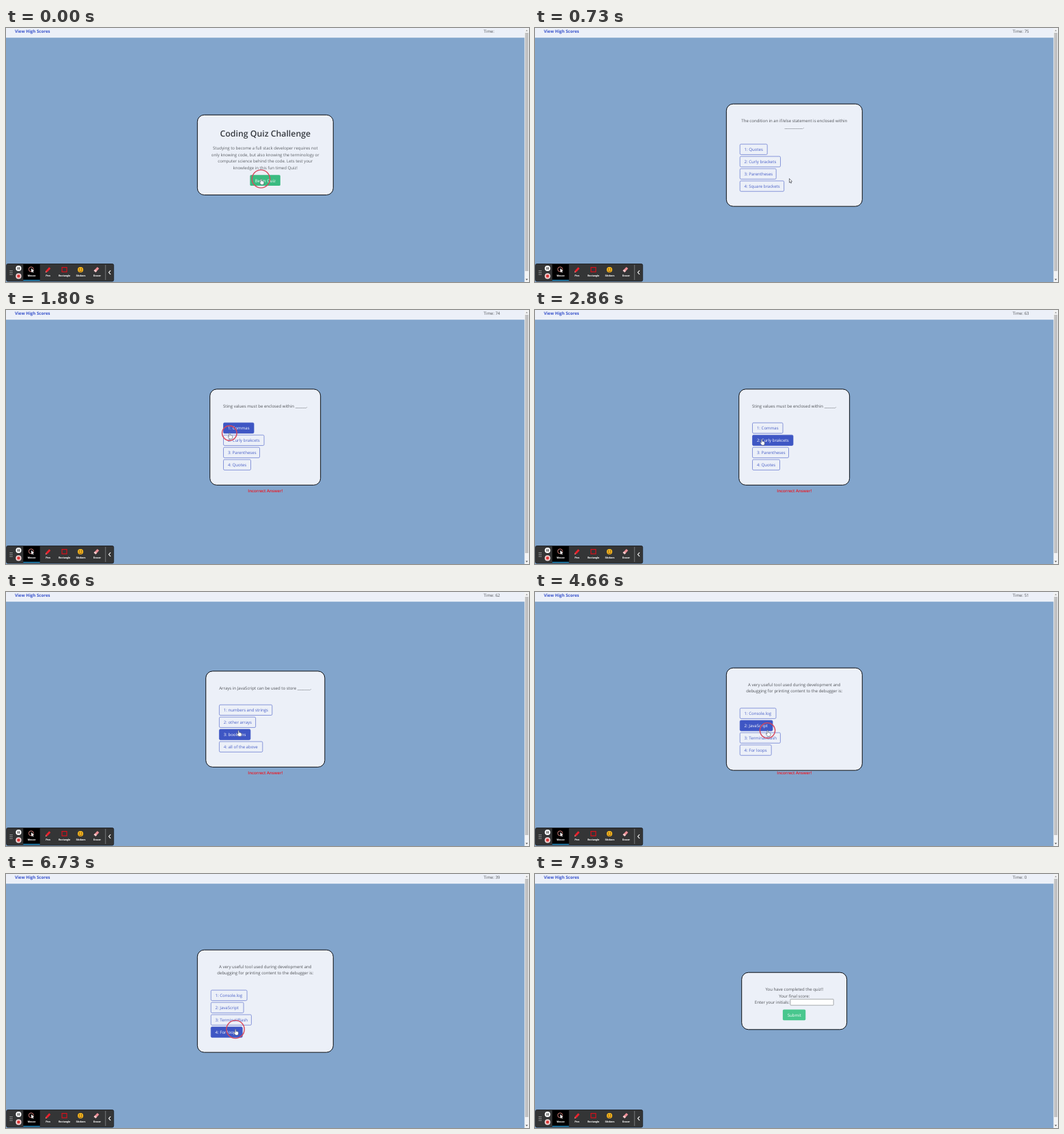
Animation of 766 by 372 pixels, one loop 8 s. Source, as an HTML page with a canvas:

```html
<!DOCTYPE html>
<html lang="en">
<head>
<meta charset="utf-8">
<title>Coding Quiz</title>
<style>
  html, body { margin: 0; width: 100%; height: 100%; overflow: hidden; background: #82a5cc; }
  canvas { display: block; width: 766px; height: 372px; }
</style>
</head>
<body>
<canvas id="stage"></canvas>
<script>
const W = 766, H = 372, LOOP = 8000, MID = 379.8;
const BODY = 6.07;
const PANEL = '#ecf0f8', INK = '#505358', BLUE = '#485fc7', BLUE_ON = '#3e56c4';
const canvas = document.getElementById('stage');
const ctx = canvas.getContext('2d');
const dpr = window.devicePixelRatio || 1;
canvas.width = W * dpr;
canvas.height = H * dpr;

// A press shows a ring; the page reacts SWITCH ms later.
const SWITCH = 130, RING_LIFE = 200;
const presses = [-70, 1660, 3460, 4530, 6660];

const ticks = [[200, 75], [1200, 74], [2200, 63], [3200, 62],
               [4200, 51], [5200, 40], [6200, 39], [6790, 0]];
const notices = [[1790, 3230], [3590, 6100]];

// Pointer moves: start, end, target x, target y
const start = [373.4, 221];
const moves = [
  [60, 400, 372.5, 220.5], [730, 1400, 327.3, 180.3], [2200, 2530, 331, 188],
  [2730, 3400, 340.5, 202.8], [5000, 5150, 340.5, 188.3],
  [5860, 6400, 336, 227.5], [7460, 7660, 350, 219]
];
const POINTER_GONE = 7800;

const questions = [
  { card: [280.3, 111.2, 199, 150], left: 300.2, top: 170.1,
    lines: ['The condition in an if/else statement is enclosed within', '__________.'],
    options: [['Quotes', 40], ['Curly brackets', 59.3], ['Parentheses', 53], ['Square brackets', 64.5]] },
  { card: [298.7, 115.9, 162, 140.5], left: 318.5, top: 165.2,
    lines: ['Sting values must be enclosed within ______.'],
    options: [['Commas', 44.5], ['Curly brakcets', 59.5], ['Parentheses', 53], ['Quotes', 40]] },
  { card: [292.7, 115.9, 174.2, 140.5], left: 312.4, top: 165.2,
    lines: ['Arrays in JavaScript can be used to store _______.'],
    options: [['numbers and strings', 77.4], ['other arrays', 53.2], ['booleans', 45.5], ['all of the above', 63.4]] },
  { card: [280.3, 111.2, 199, 150], left: 300.2, top: 170.1,
    lines: ['A very useful tool used during development and',
            'debugging for printing content to the debugger is:'],
    options: [['Console.log', 52.8], ['JavaScript', 47.8], ['Terminal/Bash', 59.2], ['For loops', 46]] }
];

const clamp = v => Math.max(0, Math.min(1, v));
const ease = v => v * v * (3 - 2 * v);
const mix = (a, b, v) => a + (b - a) * v;
const inside = (p, [x, y, w, h]) => p[0] >= x && p[0] <= x + w && p[1] >= y && p[1] <= y + h;

// Type is set large and scaled down so that glyph spacing stays even.
function text(str, x, y, { size = BODY, weight = 400, color = INK, align = 'left', font = '"Open Sans"' } = {}) {
  ctx.save();
  ctx.translate(x, y);
  ctx.scale(.25, .25);
  ctx.font = `${weight} ${size * 4}px ${font}, sans-serif`;
  ctx.textAlign = align;
  ctx.fillStyle = color;
  ctx.fillText(str, 0, 0);
  ctx.restore();
}

function centered(str, y, opts = {}) {
  text(str, MID, y, { align: 'center', ...opts });
}

function rect(x, y, w, h, color) {
  ctx.fillStyle = color;
  ctx.fillRect(x, y, w, h);
}

function box([x, y, w, h], r, fill, stroke, line = 1) {
  ctx.beginPath();
  ctx.roundRect(x, y, w, h, r);
  if (fill) { ctx.fillStyle = fill; ctx.fill(); }
  if (stroke) { ctx.strokeStyle = stroke; ctx.lineWidth = line; ctx.stroke(); }
}

function disc(x, y, r, fill) {
  ctx.beginPath();
  ctx.arc(x, y, r, 0, Math.PI * 2);
  ctx.fillStyle = fill;
  ctx.fill();
}

function ring(x, y, r, color, line) {
  ctx.beginPath();
  ctx.arc(x, y, r, 0, Math.PI * 2);
  ctx.strokeStyle = color;
  ctx.lineWidth = line;
  ctx.stroke();
}

function poly(points, fill, stroke, line = .6) {
  ctx.beginPath();
  points.forEach(([x, y]) => ctx.lineTo(x, y));
  ctx.closePath();
  if (fill) { ctx.fillStyle = fill; ctx.fill(); }
  if (stroke) { ctx.strokeStyle = stroke; ctx.lineWidth = line; ctx.stroke(); }
}

function card(b) {
  box(b, 10, PANEL, '#0c0e12', 1);
}

function pointerAt(t) {
  let [x, y] = start;
  for (const [from, to, nx, ny] of moves) {
    const v = ease(clamp((t - from) / (to - from)));
    x = mix(x, nx, v);
    y = mix(y, ny, v);
  }
  return [x, y];
}

function header(t) {
  rect(0, 0, 760, 14.2, PANEL);
  text('View High Scores', 13, 7.3, { size: 6.15, weight: 700, color: '#3853cb' });
  const tick = ticks.filter(k => k[0] <= t).pop();
  text(tick ? 'Time: ' + tick[1] : 'Time:', 699.5, 7.3);
}

function scrollbar() {
  rect(759.4, 0, 6.6, H, '#f2f3f4');
  rect(760.3, 7, 4.8, 349, '#c1c1c2');
  poly([[761.2, 4.6], [764.2, 4.6], [762.7, 2.8]], '#8a8a8a');
  poly([[761, 367.4], [764.4, 367.4], [762.7, 369.4]], '#505050');
}

// Each screen returns true when the pointer is over a button.
function intro(p) {
  card([280.3, 127.3, 199, 117.2]);
  centered('Coding Quiz Challenge', 159.2, { size: 12.3, weight: 600, color: '#363a40' });
  ['Studying to become a full stack developer requires not',
   'only knowing code, but also knowing the terminology or',
   'computer science behind the code. Lets test your',
   'knowledge in this fun timed Quiz!'
  ].forEach((s, i) => centered(s, 178.2 + i * 9.58, { color: '#5c6066' }));
  const b = [357.4, 215.3, 44.4, 15.8], on = inside(p, b);
  box(b, 1.6, on ? '#3abb81' : '#48c78e');
  centered('Begin Quiz', 225.5, { color: '#fff' });
  return on;
}

function question(q, p) {
  card(q.card);
  q.lines.forEach((s, i) => centered(s, q.card[1] + (q.lines.length > 1 ? 26.5 : 26.8) + i * 9.6));
  let hit = false;
  q.options.forEach(([label, w], i) => {
    const b = [q.left, q.top + i * 17.95, w, 15.3];
    const on = inside(p, b);
    hit = hit || on;
    box(b, 1.6, on ? BLUE_ON : null, on ? BLUE_ON : '#6678cf', .75);
    text(`${i + 1}: ${label}`, b[0] + 6.4, b[1] + 9.9, { color: on ? '#fff' : BLUE });
  });
  return hit;
}

function finish(p) {
  card([302.7, 144.2, 154, 83.6]);
  centered('You have completed the quiz!!', 171);
  centered('Your final score:', 180.6);
  text('Enter your initials:', 321.8, 190.2);
  box([374, 183.3, 63.2, 8.9], .6, '#fff', '#85888c', .7);
  const b = [362.9, 198.4, 33.4, 15.8], on = inside(p, b);
  box(b, 1.6, on ? '#3abb81' : '#48c78e');
  centered('Submit', 208.6, { color: '#fff' });
  return on;
}

function toolbar() {
  box([.7, 345.5, 157, 25.4], 2, '#343536', '#23272d', 1);
  rect(25.3, 346, 24.4, 23.4, '#000');
  rect(25.3, 368.9, 24.4, 1.2, '#1f9fe0');
  for (let i = 0; i < 6; i++)
    rect(5.7 + (i % 2) * 2.3, 355 + (i >> 1) * 2.7, 1.2, 1.2, '#c4c4c4');

  disc(18.4, 352, 4.1, '#fff');
  rect(16.8, 350.3, 1.1, 3.5, '#333');
  rect(18.9, 350.3, 1.1, 3.5, '#333');
  disc(18.4, 363.4, 4.1, '#f4dcdc');
  box([16.3, 361.3, 4.2, 4.2], .8, '#d93636');

  ['Mouse', 'Pen', 'Rectangle', 'Stickers', 'Eraser'].forEach((s, i) =>
    text(s, 37.5 + i * 24, 364.4, { size: 3.8, weight: 700, color: '#fff', align: 'center', font: 'Roboto' }));

  ring(36.8, 353.4, 3.5, '#e58a84', .9);
  poly([[37, 352], [37.2, 358], [38.5, 356.8], [39.6, 358.5], [40.4, 357.9], [39.4, 356.2], [41, 355.7]], '#fff');

  poly([[57.8, 358.2], [58.6, 355.2], [63.2, 350.2], [65.4, 352.3], [60.8, 357.2]], '#e8232d');
  poly([[57.8, 358.2], [58.3, 356.3], [59.6, 357.6]], '#f6b4a8');
  box([82, 350.6, 7, 6.6], 0, null, '#d3121c', 1.2);

  disc(109.1, 354, 4.1, '#f3b51f');
  disc(107.6, 353, .7, '#5b3a08');
  disc(110.6, 353, .7, '#5b3a08');
  ctx.beginPath();
  ctx.arc(109.1, 354.4, 2.2, .2, Math.PI - .2);
  ctx.strokeStyle = '#7a3d10';
  ctx.lineWidth = .8;
  ctx.stroke();

  poly([[128.6, 355.6], [133.8, 350], [136.4, 352.2], [131.4, 357.8]], '#ee8f96');
  poly([[128.6, 355.6], [130.3, 353.8], [133, 356], [131.4, 357.8]], '#f6d0d0');

  rect(145.4, 347, .8, 22, '#85888a');
  ctx.beginPath();
  ctx.moveTo(153.2, 355.2);
  ctx.lineTo(150.6, 358);
  ctx.lineTo(153.2, 360.8);
  ctx.strokeStyle = '#fff';
  ctx.lineWidth = 1.1;
  ctx.stroke();
}

function pointer([x, y], hand) {
  ctx.save();
  ctx.translate(x, y);
  ctx.lineJoin = 'round';
  if (hand) {
    poly([[-.6, .3], [.1, -.2], [.8, .3], [.9, 3], [2.2, 3], [3.6, 3.6], [4.5, 4.4],
          [4.4, 6.6], [3.6, 8.6], [.3, 8.6], [-1.1, 6.8], [-2.3, 4.8], [-1.7, 4.2], [-.6, 5.1]],
         '#fff', '#3b4352', .55);
  } else {
    poly([[0, 0], [0, 6], [1.3, 4.8], [2.2, 6.8], [3.1, 6.4], [2.2, 4.5], [4, 4.3]],
         '#fff', '#22262e', .6);
  }
  ctx.restore();
}

function clickRing(t, [x, y]) {
  for (const s of presses) {
    const age = t - s;
    if (age < 0 || age >= RING_LIFE) continue;
    const r = age < 70 ? mix(6, 13.2, age / 70) : mix(13.2, 8.8, (age - 70) / 130);
    ring(x, y, r, '#d6485d', 1.4);
  }
}

function draw(t) {
  ctx.setTransform(dpr, 0, 0, dpr, 0, 0);
  ctx.textRendering = 'geometricPrecision';
  rect(0, 0, W, H, '#82a5cc');
  header(t);

  const p = pointerAt(t);
  const step = presses.filter(s => t >= s + SWITCH).length;
  if (notices.some(([a, b]) => t >= a && t < b))
    centered('Incorrect Answer!', 266.9, { size: 6, weight: 600, color: '#f0141e', });

  let hand;
  if (step === 0) hand = intro(p);
  else if (step <= questions.length) hand = question(questions[step - 1], p);
  else hand = finish(p);

  scrollbar();
  toolbar();
  if (t < POINTER_GONE) {
    pointer(p, hand);
    clickRing(t, p);
  }
}

const began = performance.now();
function frame() {
  draw((performance.now() - began) % LOOP);
  requestAnimationFrame(frame);
}
draw(0);
requestAnimationFrame(frame);
</script>
</body>
</html>
```
